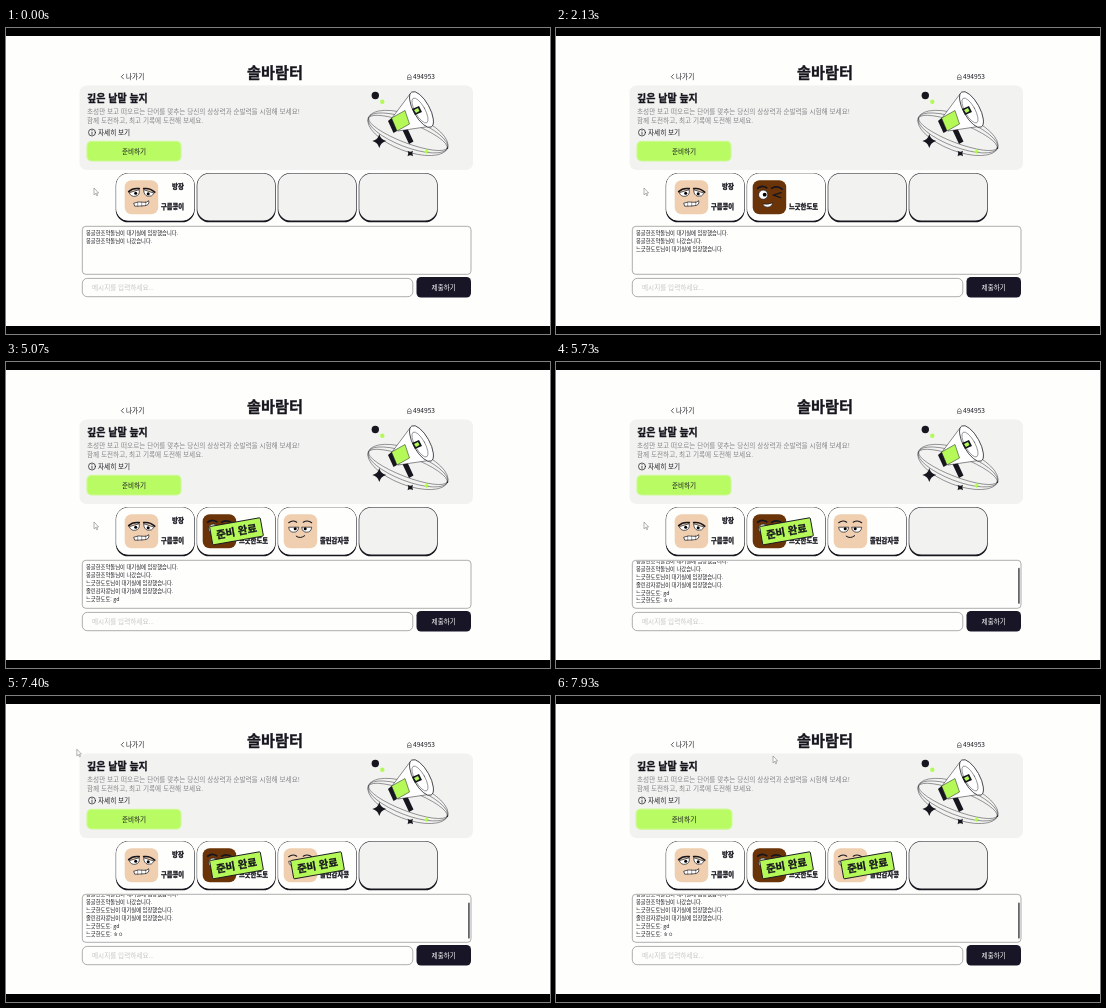
An HTML page for the animation above (8 s loop, 544x306 px).

```html
<!DOCTYPE html>
<html lang="ko">
<head>
<meta charset="utf-8">
<title>대기실</title>
<style>
  html, body { margin: 0; width: 100%; height: 100%; overflow: hidden; background: #000; }
  svg { display: block; width: 100vw; height: 100vh; }
  text { font-family: "Noto Sans CJK KR", "Noto Sans CJK", sans-serif; font-size: 6.6px; fill: #17161f; white-space: pre; }
  .heavy { font-weight: 900; stroke: #17161f; stroke-width: .3; }
  .mid { text-anchor: middle; }
  .log { font-size: 5.3px; }
  .line { fill: none; stroke: #17161f; stroke-width: .7; stroke-linecap: round; stroke-linejoin: round; }
  .inked { fill: #fff; stroke: #17161f; stroke-width: .7; stroke-linejoin: round; }
  .field { fill: #fefefc; stroke: #77777a; stroke-width: .6; }
</style>
</head>
<body>
<svg viewBox="0 0 544 306">
  <defs>
    <clipPath id="logClip"><rect x="77" y="199" width="387" height="46.6"/></clipPath>
    <path id="spark" d="M0-7Q1.3-1.3 7 0Q1.3 1.3 0 7Q-1.3 1.3-7 0Q-1.3-1.3 0-7Z"/>

    <g id="worried">
      <rect width="33.5" height="34" rx="7" fill="#efcfaf"/>
      <path d="M4.5 12.5L14.5 9.5Q15.5 15 11 16T4.5 12.5ZM19 9.5L29.5 13Q27 17 23 16T19 9.5Z" class="inked"/>
      <path d="M4 11.5Q8 7.500 14.500 8.500M19 8.500Q25 7.500 30 12" class="line" style="stroke-width:1.7"/>
      <circle cx="11" cy="13" r="1.500"/><circle cx="23.500" cy="13.500" r="1.500"/>
      <path d="M9 23Q14 21 18 22T24 20.500Q25 25 20 25.500T10 26Z" class="inked"/>
      <path d="M13 22V26M17 22V26M21 21.500V25.500" class="line" style="stroke-width:.4"/>
    </g>

    <g id="wink">
      <rect width="33.5" height="34" rx="7" fill="#6b3408"/>
      <path d="M5 8Q9 4.500 14 7.500M19 8Q25 5 29.500 9" class="line" style="stroke-width:1.8"/>
      <circle cx="10.500" cy="14.500" r="4.600" class="inked"/>
      <circle cx="12" cy="14.500" r="1.900"/>
      <path d="M28.500 12.500L20.500 15L28 17.500" class="line" style="stroke-width:1.300"/>
      <path d="M10 23.500Q15 25 20 22.500Q19 27 14.500 27Q11 27 10 23.500Z" class="inked"/>
    </g>

    <g id="sleepy">
      <rect width="33.5" height="34" rx="7" fill="#efcfaf"/>
      <path d="M5 8.5Q9 5.5 13 8M19.5 8Q24 5.5 28 8.5" class="line" style="stroke-width:1.1"/>
      <path d="M5 13H15Q14.5 18 10 18T5 13ZM18 13H28Q27.5 18 23 18T18 13Z" class="inked"/>
      <circle cx="11.5" cy="14.5" r="1.5"/><circle cx="21.5" cy="14.5" r="1.5"/>
      <path d="M12.5 22Q16.5 25 21 21.5" class="line" style="stroke-width:1"/>
    </g>

    <g id="stamp" transform="rotate(-10)">
      <rect x="-25.7" y="-9.3" width="51.4" height="18.6" rx="1" fill="#b4f958" stroke="#17161f" stroke-width=".9"/>
      <text class="heavy mid" y="3.8" style="font-size:10.4px">준비 완료</text>
    </g>
  </defs>

  <rect width="544" height="306"/>
  <rect y="8" width="544" height="290" fill="#fefefc"/>

  <path d="M117.5 46.5L115.3 48.7L117.5 50.9" class="line"/>
  <text x="120" y="51.2">나가기</text>
  <text class="heavy mid" x="269" y="50" style="font-size:15.2px">솔바람터</text>
  <path d="M401.5 51V48.5Q403.3 44.5 405.2 48.5V51ZM402.5 49.5H404.2" class="line" style="stroke-width:.5"/>
  <text x="407" y="51.2">494953</text>

  <rect x="73.5" y="57.5" width="393.5" height="84.5" rx="7" fill="#f2f3f0"/>
  <text class="heavy" x="81" y="74" style="font-size:10px">깊은 낱말 늪지</text>
  <g opacity=".5">
    <text x="81" y="86.3">초성만 보고 떠오르는 단어를 맞추는 당신의 상상력과 순발력을 시험해 보세요!</text>
    <text x="81" y="94.5">함께 도전하고, 최고 기록에 도전해 보세요.</text>
  </g>
  <circle cx="86" cy="104.5" r="3.5" class="line"/>
  <path d="M86 104.2V106.4M86 102.6V102.7" class="line"/>
  <text x="92" y="107">자세히 보기</text>
  <g id="ready">
    <rect x="-47" y="-9.8" width="94" height="19.6" rx="4.5" fill="#b8fb62" stroke="#cdf993" stroke-width="1.2"/>
    <text class="mid" y="2.4">준비하기</text>
  </g>

  <g id="megaphone">
    <g class="line" style="stroke-width:.4">
      <ellipse cx="402" cy="105" rx="42.500" ry="18" transform="rotate(21 402 105)"/>
      <ellipse cx="402" cy="105" rx="42.500" ry="14" transform="rotate(21 402 105)"/>
      <ellipse cx="402" cy="105" rx="42" ry="10" transform="rotate(21 402 105)"/>
    </g>
    <path d="M396 101L400.500 98.500L407.500 113.500L403 116Z" fill="#17161f"/>
    <path d="M386 90L404 66L426 98L392 103Z" class="inked" style="stroke-width:.5"/>
    <path d="M385.500 90L399 82.500L403.500 96L391 103Z" fill="#b4f958" stroke="#17161f" stroke-width=".5"/>
    <path d="M382 93L385.500 90L391 103L387.500 105Z" fill="#17161f"/>
    <ellipse cx="415.500" cy="81.500" rx="8" ry="20" transform="rotate(-29 415.500 81.500)" class="inked"/>
    <ellipse cx="414" cy="82.500" rx="5" ry="14" transform="rotate(-29 414 82.500)" class="line" style="stroke-width:.4"/>
    <path d="M406 81L413 78L416 84L409 87Z" fill="#17161f"/>
    <path d="M408 82L412 80L413.500 83L410 85Z" fill="#b4f958"/>
    <circle cx="369.300" cy="67.500" r="3.700" fill="#17161f"/>
    <circle cx="376.300" cy="73.700" r="2.200" fill="#b4f958"/>
    <use href="#spark" x="373.300" y="113" fill="#17161f"/>
    <use href="#spark" transform="translate(404.300 125.500) rotate(45) scale(.55)" fill="#17161f"/>
    <use href="#spark" transform="translate(420.500 123.500) scale(.4)" fill="#b4f958"/>
  </g>

  <g id="cards"></g>

  <rect x="76.300" y="198.300" width="388.700" height="48" rx="3.500" class="field"/>
  <g clip-path="url(#logClip)"><g id="log"></g></g>
  <rect id="thumb" x="462" width="1.800" height="36" rx=".9" fill="#66666a"/>

  <rect x="76.300" y="250.400" width="330.500" height="18.300" rx="5" class="field"/>
  <text x="86" y="261.700" style="fill:#c6c6c6">메시지를 입력하세요...</text>
  <rect x="410.500" y="249" width="54.500" height="20.500" rx="4.500" fill="#181527"/>
  <text class="mid" x="437.700" y="261.600" style="fill:#fff;font-weight:500">제출하기</text>

  <path id="cursor" d="M0 0V6.800L1.600 5.400L2.700 7.800L3.700 7.300L2.600 5H4.600Z" fill="#fff" stroke="#66666a" stroke-width=".5"/>
</svg>
<script>
const LOOP = 8000;
const $ = id => document.getElementById(id);

const players = [
  { name: "구름콩이", face: "worried", faceX: 9, joins: 0, host: true },
  { name: "느긋한도토", face: "wink", faceX: 6, joins: 800, ready: 3470 },
  { name: "졸린감자콩", face: "sleepy", faceX: 6, joins: 4070, ready: 6470 },
  { joins: Infinity },
];

const messages = [
  [0, "몽글한조약돌님이 대기실에 입장했습니다."],
  [0, "몽글한조약돌님이 나갔습니다."],
  [800, "느긋한도토님이 대기실에 입장했습니다."],
  [4070, "졸린감자콩님이 대기실에 입장했습니다."],
  [4800, "느긋한도토: gd"],
  [5470, "느긋한도토: ㅎㅇ"],
];

// Pointer keys: time, x, y
const pointer = [
  [7400, 71, 53], [7470, 61, 62], [7600, 78, 104],
  [7730, 124, 120], [7830, 172, 98], [7930, 217, 60],
];

$("cards").innerHTML = players.map((p, i) => `
  <g transform="translate(${109.7 + 81 * i} 145)">
    <rect width="79" height="49.3" rx="12.5" fill="#17161f"/>
    <rect x=".6" y=".5" width="77.8" height="46.9" rx="12" fill="#f2f3f0"/>
    ${p.name ? `<g class="player">
      <rect x=".6" y=".5" width="77.8" height="46.9" rx="12" fill="#fefefc"/>
      <use href="#${p.face}" x="${p.faceX}" y="7.2"/>
      ${p.host ? '<text class="heavy mid" x="62.3" y="16.3" style="font-size:6.5px">방장</text>' : ""}
      <text class="heavy mid" x="56.8" y="36.3" style="font-size:6.3px">${p.name}</text>
    </g>` : ""}
    ${p.ready ? '<use class="ready" href="#stamp" transform="translate(39.8 24.3)"/>' : ""}
  </g>`).join("");

$("log").innerHTML = messages.map(([, text], i) =>
  `<text class="log" x="80" y="${207 + 7.9 * i}">${text}</text>`).join("");

const clamp = x => Math.max(0, Math.min(1, x));
const show = (node, on) => node && node.setAttribute("visibility", on ? "visible" : "hidden");
const move = (node, x, y, scale = 1) =>
  node.setAttribute("transform", `translate(${x} ${y}) scale(${scale})`);

function pointerAt(t) {
  if (t < pointer[0][0]) return [88, 160];
  const next = pointer.findIndex(k => k[0] > t);
  if (next < 0) return pointer[pointer.length - 1].slice(1);
  const [t0, x0, y0] = pointer[next - 1], [t1, x1, y1] = pointer[next];
  const p = (t - t0) / (t1 - t0);
  return [x0 + (x1 - x0) * p, y0 + (y1 - y0) * p];
}

function draw(t) {
  players.forEach((p, i) => {
    const card = $("cards").children[i];
    show(card.querySelector(".player"), t >= p.joins);
    show(card.querySelector(".ready"), t >= p.ready);
  });
  messages.forEach(([at], i) => show($("log").children[i], t >= at));

  const scroll = 6.8 * (1 - (1 - clamp((t - 5470) / 500)) ** 3);
  move($("log"), 0, -scroll);
  show($("thumb"), t >= 5470);
  $("thumb").setAttribute("y", 199.8 + scroll);

  move($("ready"), 128, 123.2, 1 + .02 * clamp((t - 7630) / 200));
  move($("cursor"), ...pointerAt(t));
}

function frame(now) {
  draw(now % LOOP);
  requestAnimationFrame(frame);
}
draw(0);
requestAnimationFrame(frame);
</script>
</body>
</html>
```
